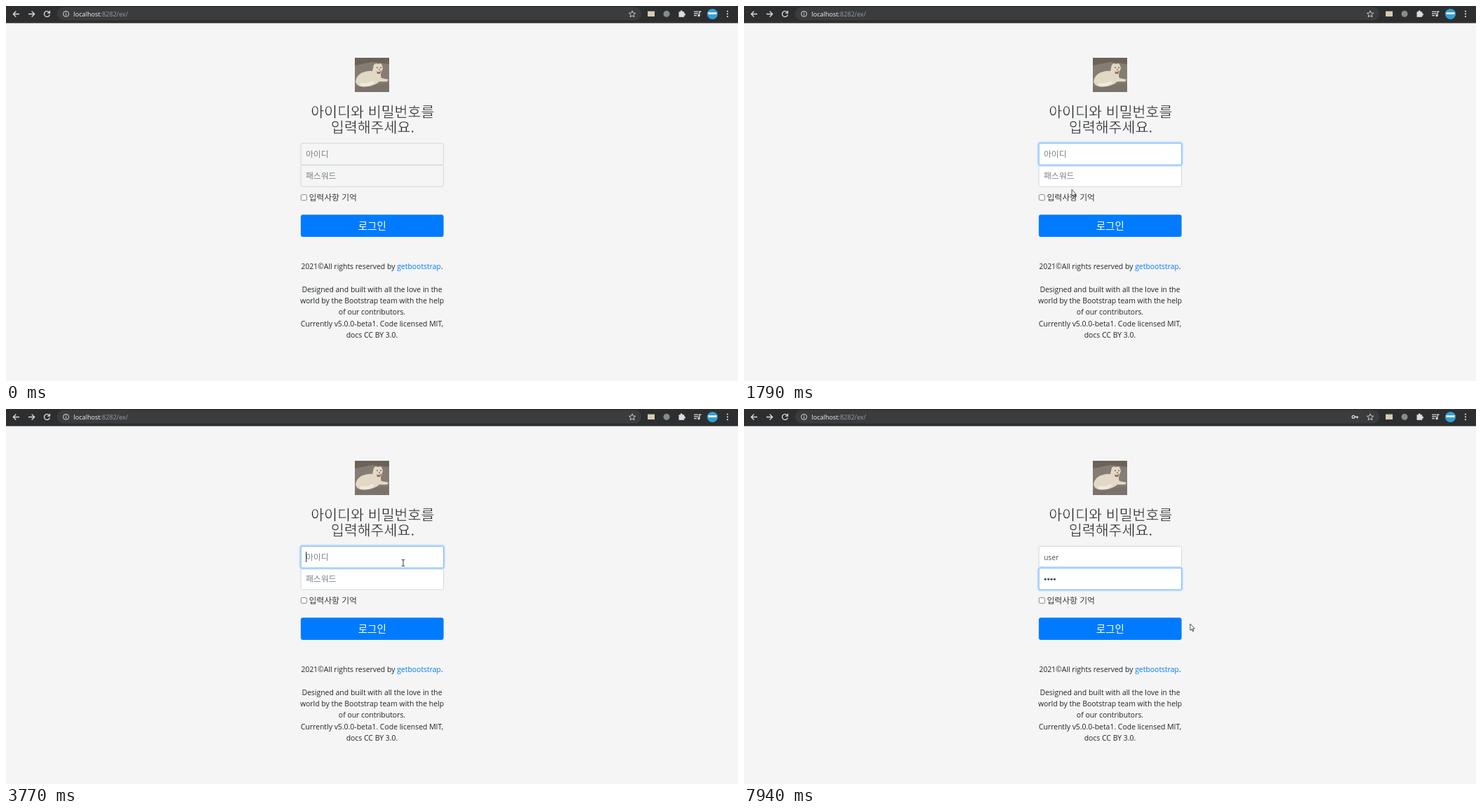
An HTML page for the animation above (8 s loop, 1045 by 536 pixels).

```html
<!DOCTYPE html>
<html lang="ko">
<head>
<meta charset="utf-8">
<title>Login</title>
<style>
  html, body { margin: 0; width: 100%; height: 100%; overflow: hidden; background: #f5f5f5; }
  svg { display: block; width: 1045px; height: 536px; }
  text { font: 10.45px "Open Sans", "Noto Sans", sans-serif; fill: #212529; white-space: pre; }
  .ko { font: 11.8px "Noto Sans CJK KR", "Noto Sans CJK", sans-serif; fill: #343a40; }
  /* a background-coloured outline thins the strokes */
  .title { font-size: 20.6px; fill: #212529; stroke: #f5f5f5; stroke-width: .45; }
  .button { font-size: 14.5px; fill: #fff; }
  .mid { text-anchor: middle; }
  .hint { fill: #7b838a; }
  .value { font-size: 10.3px; fill: #495057; }
  .url { font-size: 9.1px; fill: #9aa0a6; }
  .box { stroke: #ced4da; stroke-width: .9; }
  .ring rect { fill: none; }
  .icons { fill: none; stroke: #dcdde0; stroke-width: 1.3; }
  .solid { fill: #dcdde0; stroke: none; }
</style>
</head>
<body>
<svg viewBox="0 0 1045 536">
  <rect width="1045" height="536" fill="#f5f5f5"/>

  <rect width="1045" height="24.5" fill="#2d2e30"/>
  <rect x="73" y="1.5" width="834" height="19" rx="9.5" fill="#3b3c3e"/>
  <g class="icons">
    <path d="M19 11.5H10.5M14.3 7.5L10.3 11.5L14.3 15.5"/>
    <path d="M32 11.5H40.5M36.7 7.5L40.7 11.5L36.7 15.5"/>
    <path d="M61.5 8.7A4 4 0 1 0 62.4 12.5M62.5 6.8V10H59.3"/>
    <circle cx="85.7" cy="11.3" r="4" stroke-width="1"/>
    <path d="M85.7 10.7V13.6M85.7 8.8V9.9" stroke-width="1"/>
    <path d="M894 6.8L895.3 9.9L898.6 10.2L896.1 12.4L896.9 15.7L894 13.9L891.1 15.7L891.9 12.4L889.4 10.2L892.7 9.9Z" stroke-width=".9"/>
    <path d="M982 8.2H988.5M982 10.9H988.5M982 13.6H986M990 13.5V8H992.5"/>
    <g id="key">
      <circle cx="870" cy="11.3" r="1.9"/>
      <path d="M872 11.3H877M875.5 11.3V13.4" stroke-width="1.6"/>
    </g>
    <g class="solid">
      <path d="M960.5 8.2H968.2V15.8H960.5Z"/>
      <circle cx="964.2" cy="7.8" r="1.6"/><circle cx="968.5" cy="12" r="1.6"/>
      <circle cx="989" cy="13.7" r="1.6"/>
      <circle cx="1030" cy="7.5" r="1.1"/><circle cx="1030" cy="11.3" r="1.1"/><circle cx="1030" cy="15.1" r="1.1"/>
    </g>
  </g>
  <rect x="916" y="7.5" width="10" height="7.5" fill="#d5cbb0"/>
  <circle cx="943" cy="11.3" r="4.5" fill="#868b8b"/>
  <circle cx="1008.5" cy="11.5" r="7.6" fill="#349fd2"/>
  <path d="M1002 9H1015L1014 12H1003Z" fill="#d9edf5"/>
  <text class="url" x="96.5" y="14.6"><tspan fill="#f1f3f4">localhost</tspan>:8282/ex/</text>

  <g transform="translate(498 74)">
    <rect width="49" height="49" fill="#857c73"/>
    <path d="M0 0H49V9L25 6L0 11Z" fill="#6b6258"/>
    <path d="M0 41L49 36V49H0Z" fill="#7b736b"/>
    <path d="M1 34Q2 26 9 22Q17 18 25 19L27 10L30 8L33 9L37 8L39 11L40 15L38 20Q36 25 38 29L48 31L46 34L35 34L31 37Q19 43 8 41Q2 39 1 34Z" fill="#e2d8c6"/>
    <path d="M8 36Q18 38 25 33L28 36Q18 42 8 40Z" fill="#f1eadc"/>
    <path d="M31 19Q34 22 38 18L36 23H32Z" fill="#a06c58"/>
    <path d="M31 14H33M36 14H38M34 17H36" stroke="#40362f" stroke-width="1.2"/>
  </g>

  <text class="ko title mid" x="523.3" y="158.5">아이디와 비밀번호를</text>
  <text class="ko title mid" x="523.5" y="181.2">입력해주세요.</text>

  <g id="fields">
    <rect class="box" x="421" y="196.2" width="203.6" height="31" rx="2"/>
    <rect class="box" x="421" y="227.4" width="203.6" height="30.8" rx="2"/>
  </g>
  <g class="ring" id="ring-name">
    <rect x="419.7" y="194.9" width="206.2" height="33.6" rx="3.4" stroke="#bfdeff" stroke-width="2.2"/>
    <rect x="421" y="196.2" width="203.6" height="31" rx="2" stroke="#80bdff"/>
  </g>
  <g class="ring" id="ring-pass">
    <rect x="419.7" y="226.2" width="206.2" height="33.3" rx="3.4" stroke="#bfdeff" stroke-width="2.2"/>
    <rect x="421" y="227.4" width="203.6" height="30.8" rx="2" stroke="#80bdff"/>
  </g>
  <text class="ko hint" id="hint-name" x="428" y="216">아이디</text>
  <text class="ko hint" id="hint-pass" x="428" y="247">패스워드</text>
  <text class="value" id="name" x="428" y="216"></text>
  <g id="dots" fill="#495057"></g>
  <rect id="caret" width="1" height="15" fill="#333"/>

  <rect x="421.2" y="269.7" width="8" height="8" rx="1.4" fill="#fff" stroke="#767676" stroke-width=".9"/>
  <text class="ko" x="432.5" y="278">입력사항 기억</text>
  <rect x="420.8" y="298.3" width="203.9" height="31.8" rx="3" fill="#007bff"/>
  <text class="ko button mid" x="522.8" y="320">로그인</text>

  <text class="mid" x="522.5" y="375.8">2021©All rights reserved by <tspan fill="#007bff">getbootstrap</tspan>.</text>
  <text class="mid" x="522.5" y="408.6">Designed and built with all the love in the</text>
  <text class="mid" x="522.5" y="424.9">world by the Bootstrap team with the help</text>
  <text class="mid" x="522.5" y="441.2">of our contributors.</text>
  <text class="mid" x="522.5" y="457.5">Currently v5.0.0-beta1. Code licensed MIT,</text>
  <text class="mid" x="522.5" y="473.8">docs CC BY 3.0.</text>

  <path id="beam" d="M-2.2 -4.5H-.6L0 -4L.6 -4.5H2.2M0 -4V4M-2.2 4.5H-.6L0 4L.6 4.5H2.2" fill="none" stroke="#333"/>
  <path id="arrow" d="M0 0V9.4L2.1 7.5L3.6 10.8L5 10.2L3.6 7H6.3Z" fill="#fff" stroke="#222" stroke-width=".8"/>
</svg>
<script>
const LOOP = 8000;
const $ = id => document.getElementById(id);

// [time, focused field, name text, password length]; each entry restarts the caret blink
const STATES = [
  [0, '', '', 0],
  [1290, 'name', '', 0],
  [1990, 'pass', '', 0],
  [2770, 'name', '', 0],
  [3870, 'name', '', 0],
  [4360, 'name', 'u', 0],
  [4950, 'name', 'use', 0],
  [5150, 'name', 'uset', 0],
  [5950, 'name', 'use', 0],
  [6050, 'name', 'user', 0],
  [6150, 'pass', 'user', 0],
  [6750, 'pass', 'user', 1],
  [7050, 'pass', 'user', 2],
  [7250, 'pass', 'user', 3],
  [7440, 'pass', 'user', 4]
];

// [time, x, y]
const POINTER = [
  [190, 892, 30], [490, 690, 190], [690, 540, 274], [990, 479, 214],
  [1290, 479, 214], [1390, 479, 238], [1690, 476, 273], [1990, 452, 241],
  [2190, 449, 238], [2490, 446, 236], [2770, 555, 214], [2970, 567, 220],
  [7590, 567, 220], [7690, 610, 226], [7840, 694, 284], [7940, 637, 307]
];

const DOT_STEP = 4.4;
for (let i = 0; i < 4; i++) {
  const dot = document.createElementNS('http://www.w3.org/2000/svg', 'circle');
  dot.setAttribute('cx', 430.2 + i * DOT_STEP);
  dot.setAttribute('cy', 243.3);
  dot.setAttribute('r', 1.6);
  $('dots').append(dot);
}

const show = (el, on) => el.setAttribute('visibility', on ? 'visible' : 'hidden');

function pointerAt(t) {
  const stepped = Math.floor((t + 10) / 50) * 50 - 10;
  const next = POINTER.findIndex(p => p[0] > stepped);
  if (next < 0) return POINTER.at(-1).slice(1);
  if (next === 0) return POINTER[0].slice(1);
  const [t0, x0, y0] = POINTER[next - 1], [t1, x1, y1] = POINTER[next];
  const k = (stepped - t0) / (t1 - t0);
  return [x0 + (x1 - x0) * k, y0 + (y1 - y0) * k];
}

function glow(field, t) {
  const changes = STATES.filter((s, i) => s[0] <= t && (!i || s[1] !== STATES[i - 1][1]));
  const [since, focus] = changes.at(-1);
  const k = Math.min(1, (t - since + 20) / 100);
  if (focus === field) return k;
  return changes.at(-2)?.[1] === field ? 1 - k : 0;
}

function draw(t) {
  const [since, focus, name, length] = STATES.findLast(s => s[0] <= t);
  $('fields').setAttribute('fill', t < 1290 ? '#f5f5f5' : '#fff');
  for (const field of ['name', 'pass']) $('ring-' + field).setAttribute('opacity', glow(field, t));
  $('name').textContent = name;
  show($('hint-name'), !name);
  show($('hint-pass'), !length);
  show($('key'), length);
  [...$('dots').children].forEach((dot, i) => show(dot, i < length));

  const inPass = focus === 'pass';
  const typed = inPass ? length * DOT_STEP : name ? $('name').getComputedTextLength() : 0;
  $('caret').setAttribute('x', Math.floor(428 + typed));
  $('caret').setAttribute('y', inPass ? 235 : 204);
  show($('caret'), focus && (t - since) % 1000 < 500);

  const [x, y] = pointerAt(t);
  const overField = x > 421 && x < 625 && y > 196 && y < 259;
  const visible = t >= 200;
  for (const id of ['beam', 'arrow']) $(id).setAttribute('transform', `translate(${x} ${y})`);
  show($('beam'), visible && overField);
  show($('arrow'), visible && !overField);
}

const start = performance.now();
function frame() {
  draw((performance.now() - start) % LOOP);
  requestAnimationFrame(frame);
}
frame();
</script>
</body>
</html>
```
